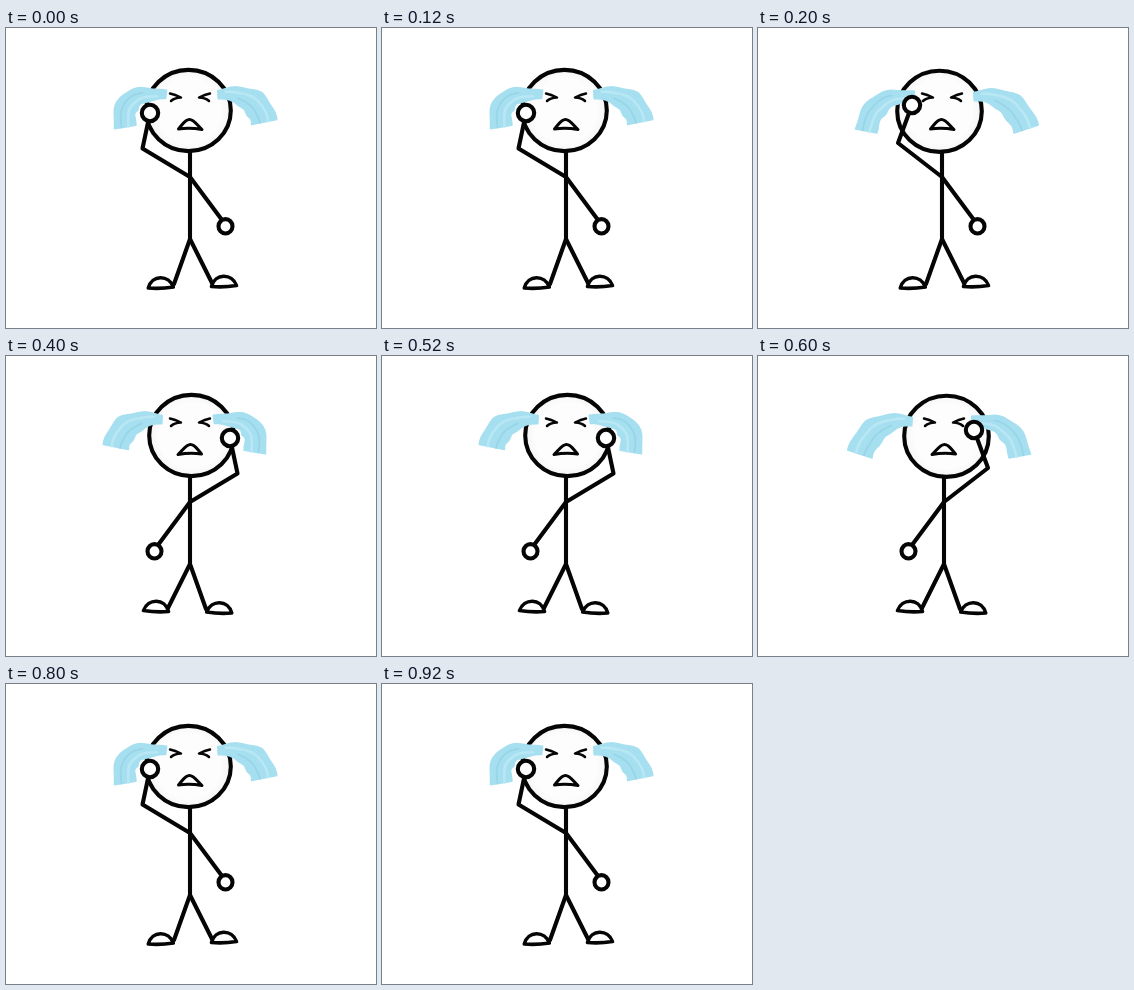
Write an HTML page with a canvas that moves like this. It is 370x300 px and loops after 1 s.

```html
<!DOCTYPE html>
<html lang="en">
<head>
<meta charset="utf-8">
<title>Crying stick figure</title>
<style>
html, body { margin: 0; width: 100%; height: 100%; overflow: hidden; background: #fff; }
canvas { display: block; }
</style>
</head>
<body>
<canvas id="stage" width="370" height="300"></canvas>
<script>
const ctx = document.getElementById('stage').getContext('2d');
const INK = '#050505';
const STEP = 200;
const LIMB = 4.1;

// A tear is a curved spine: start, control, end
const wipeLow = {
  head: [182.5, 82.5],
  hand: [144, 85],
  elbow: [136.5, 120.5],
  tears: [[[160, 67], [113, 61], [119, 99]], [[212, 66], [252, 64], [258, 94]]]
};
const wipeHigh = {
  head: [181.5, 83.3],
  hand: [154, 77],
  elbow: [140, 115],
  tears: [[[156, 68], [115, 65], [108, 103]], [[216, 68], [256, 65], [268, 101]]]
};

// Each step: pose, mirror axis sum (0 = not mirrored), vertical shift
const steps = [
  [wipeLow, 0, 0],
  [wipeHigh, 0, 0],
  [wipeLow, 368, -3],
  [wipeHigh, 370, -3],
  [wipeLow, 0, 0]
];

function stroke(width, color = INK) {
  ctx.lineWidth = width;
  ctx.strokeStyle = color;
  ctx.lineCap = ctx.lineJoin = 'round';
  ctx.stroke();
}

function fill(color) {
  ctx.fillStyle = color;
  ctx.fill();
}

function line(points, width = LIMB, color = INK) {
  ctx.beginPath();
  points.forEach(p => ctx.lineTo(...p));
  stroke(width, color);
}

function oval(x, y, rx, ry, color = '#fff') {
  ctx.beginPath();
  ctx.ellipse(x, y, rx, ry, 0, 0, Math.PI * 2);
  fill(color);
  stroke(LIMB);
}

// Point beside the spine at t; side runs from -1 to 1 across the widening stream
function tearPoint([a, b, c], t, side, tip) {
  const u = 1 - t;
  const mix = k => u * u * a[k] + 2 * u * t * b[k] + t * t * c[k];
  const slope = k => u * (b[k] - a[k]) + t * (c[k] - b[k]);
  const dx = slope(0), dy = slope(1), len = Math.hypot(dx, dy);
  const wobble = 0.7 * Math.sin(t * 17 + side * 2);
  const r = side * (4 + (tip - 4) * Math.min(1, t * 1.7) + wobble) / len;
  return [mix(0) - dy * r, mix(1) + dx * r];
}

function drawTear(spine, tip) {
  const edge = (side, from = 0) => Array.from({ length: 25 },
    (_, i) => tearPoint(spine, from + (1 - from) * i / 24, side, tip));
  ctx.beginPath();
  [...edge(-1), ...edge(1).reverse()].forEach(p => ctx.lineTo(...p));
  ctx.closePath();
  fill('#a6dff0');
  stroke(1.6, '#a6dff0');
  line(edge(-0.35, 0.1), 2.5, '#b9e8f4');
  line(edge(0.35, 0.3), 1.8, '#98d5e7');
}

function drawEye(x, dir) {
  ctx.beginPath();
  ctx.moveTo(x, 65.5);
  ctx.quadraticCurveTo(x + 5 * dir, 66.5, x + 11 * dir, 69.5);
  ctx.quadraticCurveTo(x + 4 * dir, 70, x + dir, 73);
  stroke(2.5);
}

function drawMouth() {
  ctx.beginPath();
  ctx.moveTo(172.5, 101);
  ctx.bezierCurveTo(177, 96, 179, 91.5, 183.5, 91.5);
  ctx.bezierCurveTo(188, 91.5, 191, 97, 196, 101.5);
  ctx.quadraticCurveTo(184, 99.5, 172.5, 101);
  stroke(3);
}

function drawFoot(x, y) {
  ctx.beginPath();
  ctx.moveTo(x - 12.5, y);
  ctx.bezierCurveTo(x - 9, y - 13.5, x + 8, y - 13.5, x + 12.5, y - 1);
  ctx.quadraticCurveTo(x, y + 1, x - 12.5, y);
  fill('#fff');
  stroke(3.6);
}

function drawFigure({ head: [x, y], hand, elbow, tears }) {
  drawFoot(154.8, 260);
  drawFoot(218, 258.5);
  line([[184, 124], [184, 211], [168, 256]]);
  line([[184, 211], [206, 255]]);
  line([[184, 149], [216, 192]]);
  oval(219.5, 198.3, 7, 7.2);

  const skin = ctx.createRadialGradient(x, y, 32, x, y, 43);
  skin.addColorStop(0, '#fdfdfd');
  skin.addColorStop(1, '#f4f4f4');
  oval(x, y, 42.3, 40.6, skin);
  drawEye(164, 1);
  drawEye(204, -1);
  drawMouth();
  drawTear(tears[0], 10.5);
  drawTear(tears[1], 12.5);
  line([hand, elbow, [184, 149]]);
  oval(...hand, 8.2, 8.2);
}

function frame() {
  const i = Math.floor(performance.now() / STEP) % steps.length;
  const [pose, mirror, dy] = steps[i];
  ctx.setTransform(1, 0, 0, 1, 0, 0);
  ctx.fillStyle = '#fff';
  ctx.fillRect(0, 0, 370, 300);
  ctx.setTransform(mirror ? -1 : 1, 0, 0, 1, mirror, dy);
  drawFigure(pose);
  requestAnimationFrame(frame);
}
frame();
</script>
</body>
</html>
```
